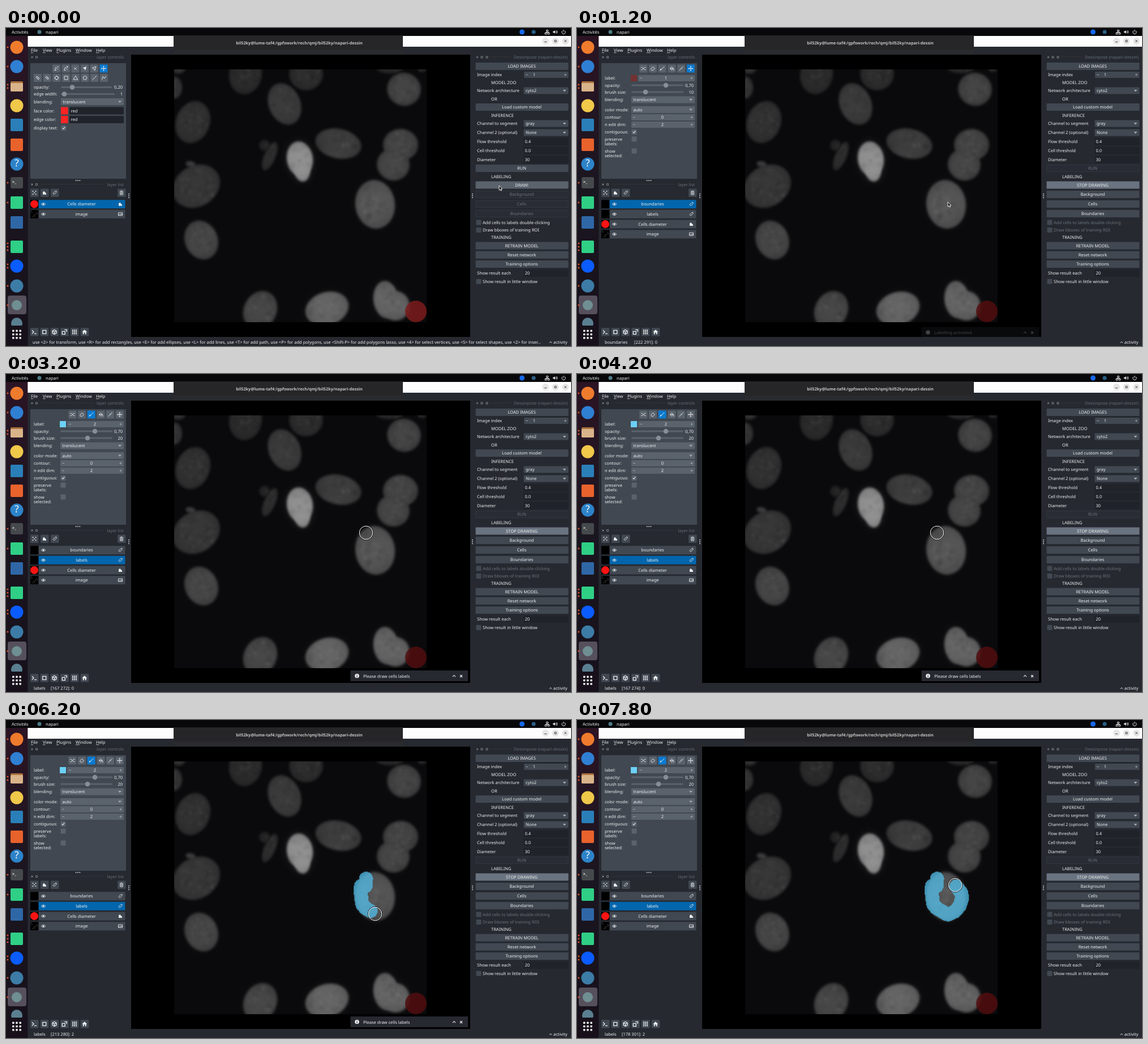
Animation of 998 by 561 pixels, one loop 8 s. Source, as an HTML page with a canvas:

```html
<!DOCTYPE html>
<html lang="fr">
<head>
<meta charset="utf-8">
<title>napari</title>
<style>
html, body { margin: 0; width: 100%; height: 100%; overflow: hidden; background: #000; }
canvas { display: block; }
</style>
</head>
<body>
<canvas id="stage" width="998" height="561"></canvas>
<script>
const LOOP = 8000, STEP = 100;
const DRAW_ON = 800, CELLS_ON = 2500, PAINT_ON = 4200;
const BG = '#262930', PANEL = '#414851', LIGHT = '#5a626c', PRESSED = '#6a7380', FIELD = '#20232a';
const BLUE = '#0366ad', TEXT = '#eef0f1', DIM = '#666c74', RED = '#fb2424';
const ctx = document.getElementById('stage').getContext('2d');

// Pointer path: time, x, y
const PATH = [
  [0, 872, 282], [300, 872, 282], [700, 800, 330], [1000, 670, 375], [1100, 657.6, 348],
  [1200, 656, 311], [1500, 668, 309], [1900, 850, 316], [2200, 876, 311], [2600, 876, 311],
  [3000, 650, 286], [3100, 634, 280], [3200, 636, 280], [4200, 636, 280], [4500, 635, 293],
  [4700, 627, 293], [4850, 626, 299], [5100, 628, 317], [5200, 629, 323], [5600, 630, 326],
  [5900, 635, 332], [6100, 644, 337], [6200, 652, 342], [6400, 656, 343], [6700, 667, 338],
  [6950, 676, 328], [7200, 680, 315], [7400, 679, 305], [7700, 670, 293.6], [7800, 668, 291]
];

function pointer(t) {
  const i = PATH.findIndex(p => p[0] > t);
  if (i < 0) return PATH[PATH.length - 1].slice(1);
  if (i === 0) return PATH[0].slice(1);
  const [t0, x0, y0] = PATH[i - 1], [t1, x1, y1] = PATH[i];
  const k = (t - t0) / (t1 - t0);
  return [x0 + (x1 - x0) * k, y0 + (y1 - y0) * k];
}

// ---------- drawing helpers ----------
function box(x, y, w, h, color, r = 0) {
  ctx.fillStyle = color;
  ctx.beginPath();
  ctx.roundRect(x, y, w, h, r);
  ctx.fill();
}
function disc(x, y, r, color) {
  ctx.fillStyle = color;
  ctx.beginPath();
  ctx.arc(x, y, r, 0, 7);
  ctx.fill();
}
function ring(x, y, r, color, width) {
  ctx.strokeStyle = color;
  ctx.lineWidth = width;
  ctx.beginPath();
  ctx.arc(x, y, r, 0, 7);
  ctx.stroke();
}
function text(s, x, y, color = TEXT, align = 'left', font = '7.54px') {
  ctx.font = font + ' "Noto Sans", sans-serif';
  ctx.textRendering = 'geometricPrecision';
  ctx.textAlign = align;
  ctx.fillStyle = color;
  ctx.fillText(s, x, y + 2.7);
}
function icon(x, y, d, color = TEXT, fill = false, width = 0.9) {
  ctx.save();
  ctx.translate(x, y);
  ctx.lineWidth = width;
  ctx.strokeStyle = ctx.fillStyle = color;
  const path = new Path2D(d);
  fill ? ctx.fill(path) : ctx.stroke(path);
  ctx.restore();
}

const CROSS = 'M-2-2L2 2M2-2L-2 2', CHECK = 'M-2.2 0L-.7 1.7L2.3-1.8', DOWN = 'M-3-1.5H3L0 2Z';
const SQUARE = 'M-3-3H3V3H-3Z', POLY = 'M-3.5-1L0-3.5L3.5-1L2 3H-2Z', ARROW = 'M3-3.5L-3.5-1L-.5 .5L1 3.5Z';
const PAN = 'M-4 0H4M0-4V4M-1.2-2.8L0-4L1.2-2.8M-1.2 2.8L0 4L1.2 2.8M-2.8-1.2L-4 0L-2.8 1.2M2.8-1.2L4 0L2.8 1.2';
const TAG = 'M-3 1L1-3H3V-1L-1 3Z', SHAPES = 'M-3 3V-1L-1-3L3 1V3Z';
const PICTURE = 'M-3.5-2.5H3.5V2.5H-3.5ZM-3 2L-1 0L.5 1.2L2-.6L3.3 1.5';
const LINK = 'M-3-1L-1-3L3 1L1 3ZM-1.5 .5L1.5-.5', VERTEX = 'M-3 3L-1-2L3 2M-3 3H0';
const LABEL_TOOLS = ['M-4-2H-2L2 2H4M-4 2H-2L2-2H4', 'M-3.5 1L0-3L3.5 0L.5 3H-2Z',
  'M3.5-3.5L-1 1M-1 1L-3.5 3.5L-3 1Z', 'M-3 0L0-3L3 0L0 3ZM3.5 1V3.5M-3 0H3', 'M3.5-3.5L1-1M-.5-1.5L1.5 .5M.5-.5L-3.5 3.5', PAN];
const SHAPE_TOOLS = [VERTEX + 'M1-3H4', VERTEX + 'M1-3H4M2.5-4.5V-1.5', CROSS, ARROW, ARROW, PAN];
const SHAPE_TOOLS_2 = [LINK, LINK, 'M3 0A3 3 0 1 1-3 0A3 3 0 1 1 3 0M-4 0H-2M2 0H4M0-4V-2M0 2V4', SQUARE,
  'M0-3.5L3.8 3H-3.8Z', POLY, 'M-3.5 3.5L3.5-3.5', 'M-3.5 3L-1.5-2.5L1 1L3.5-3'];

function tools(list, x, y, selected, filled = -1) {
  list.forEach((d, i) => {
    const cx = x + i * 16.7;
    box(cx - 7, y - 7, 14, 14, i === selected ? '#0a7ad0' : LIGHT, 1);
    icon(cx, y, d, TEXT, i === filled);
  });
}
function button(s, y, state) {
  const off = state === 'off';
  const fill = { hot: LIGHT, pressed: PRESSED, off: '#343941' }[state] || PANEL;
  box(829.5, y - 6.5, 164, 13, fill, 1);
  if (off) box(830.3, y - 5.7, 162.4, 11.4, '#292c34', 1);
  text(s, 911, y, off ? '#6d737b' : TEXT, 'center');
}
function combo(s, x, y, right, color) {
  box(x, y - 6, right - x, 12, color, 1);
  text(s, x + 3.5, y);
  icon(right - 7, y, DOWN, '#a4aab1', true);
}
function spin(s, x, y, right, at, color) {
  box(x, y - 5.5, right - x, 11, color, 1);
  icon(x + 5, y, 'M-2 0H2', '#a4aab1');
  icon(right - 5.5, y, 'M-2 0H2M0-2V2', '#a4aab1');
  text(s, at, y, TEXT, 'center');
}
function field(s, x, y, right) {
  box(x, y - 6.5, right - x, 13, FIELD, 1);
  text(s, x + 2.5, y);
}
function checkbox(x, y, checked, color = PANEL) {
  box(x - 4.5, y - 4.5, 9, 9, color, 1);
  if (checked) icon(x, y, CHECK, TEXT, false, 1.1);
}
function slider(x, right, y, at, value) {
  box(x, y - 1.5, right - x, 3, LIGHT, 1.5);
  disc(at, y, 4.3, '#868e98');
  text(value, 206, y, TEXT, 'right');
}
function dockTitle(s, x, y, right, from, to) {
  icon(x, y, 'M-1.5-1.5L1.5 1.5M1.5-1.5L-1.5 1.5', '#a0a5ab');
  icon(x + 8, y, 'M-1.5-1.5H1.5V1.5H-1.5Z', '#a0a5ab', false, 0.7);
  box(from, y - 1, to - from, 0.7, '#343840');
  text(s, right, y, DIM, 'right');
}

// ---------- microscope picture, drawn once ----------
// x, y, rx, ry, rotation, brightness
const NUCLEI = [
  [330, 166, 30, 38, .35, 50], [297, 105, 14, 20, 0, 52], [304, 72, 13, 9, 0, 46], [423, 82, 29, 35, .2, 44],
  [530, 81, 30, 29, 0, 46], [492, 134, 28, 38, -.4, 60], [703, 108, 30, 29, .4, 70], [587, 204, 41, 26, .2, 62],
  [519, 231, 23, 31, -.15, 146], [523, 250, 14, 21, -.1, 146], [466, 226, 10, 27, .4, 46], [457, 207, 10, 10, 0, 38],
  [697, 206, 31, 28, 0, 70], [684, 241, 29, 28, .3, 72], [336, 279, 44, 36, -.55, 56], [326, 240, 9, 5, .2, 64],
  [652, 311, 35, 43, -.12, 88], [345, 374, 29, 35, -.4, 72], [449, 498, 29, 35, .45, 72],
  [567, 495, 39, 29, -.3, 102], [671, 479, 22, 33, -.1, 102], [688, 490, 25, 26, 0, 102], [678, 71, 24, 9, 0, 40],
  [735, 72, 8, 6, 0, 40]
];

function makePicture() {
  const canvas = document.createElement('canvas');
  canvas.width = 998;
  canvas.height = 561;
  const g = canvas.getContext('2d');
  let seed = 7;
  const random = () => (seed = seed * 16807 % 2147483647) / 2147483647;
  const gray = v => `rgb(${v},${v},${v + 1})`;
  g.beginPath();
  g.rect(297, 73, 446, 446);
  g.clip();
  g.fillStyle = '#0a0a0c';
  g.fillRect(297, 73, 446, 446);
  for (const [x, y, rx, ry, angle, v] of NUCLEI) {
    const outline = new Path2D();
    outline.ellipse(x, y, rx, ry, angle, 0, 7);
    g.save();
    // Lightening lets touching nuclei merge without a seam
    g.globalCompositeOperation = 'lighten';
    g.filter = 'blur(8px)';
    g.fillStyle = gray(Math.round(v * .22));
    g.fill(outline);
    g.filter = 'blur(2px)';
    const shade = g.createRadialGradient(x, y, 0, x, y, Math.max(rx, ry));
    shade.addColorStop(0, gray(v));
    shade.addColorStop(.6, gray(Math.round(v * .96)));
    shade.addColorStop(1, gray(Math.round(v * .82)));
    g.fillStyle = shade;
    g.fill(outline);
    g.globalCompositeOperation = 'source-over';
    g.clip(outline);
    for (let i = 0; i < rx * ry / 25; i++) {
      const a = random() * 7, d = Math.sqrt(random()) * .85;
      g.fillStyle = random() < .5 ? 'rgba(255,255,255,.035)' : 'rgba(0,0,0,.06)';
      g.beginPath();
      g.arc(x + Math.cos(a) * rx * d, y + Math.sin(a) * ry * d, 1.5 + random() * 2.5, 0, 7);
      g.fill();
    }
    g.restore();
  }
  return canvas;
}
const picture = makePicture();

// ---------- desktop ----------
function desktop() {
  box(0, 0, 998, 14, '#08080a');
  disc(59, 7, 3.5, '#4d7b86');
  text('Activités', 10, 7);
  text('napari', 70, 7);
  disc(911.5, 7, 4.5, '#1668e8');
  disc(932, 7, 3.5, '#2a5f86');
  icon(956, 7, 'M-1.5-3.5H1.5V-1H-1.5ZM-4 1.5H-1V4H-4ZM1 1.5H4V4H1ZM0-1V.5M-2.5 1.5V.5H2.5V1.5');
  icon(970, 7, 'M-4-1H-2L0-3V3L-2 1H-4Z', TEXT, true);
  icon(970, 7, 'M1.5-1.5Q3 0 1.5 1.5M2.7-3Q5 0 2.7 3');
  icon(985, 7, 'M-2-2.2A3.2 3.2 0 1 0 2-2.2M0-4V-.5');

  const shade = ctx.createLinearGradient(0, 14, 0, 561);
  shade.addColorStop(0, '#2c1424');
  shade.addColorStop(.5, '#1a1620');
  shade.addColorStop(1, '#17101a');
  box(0, 14, 38.5, 547, shade);
  box(3, 472, 33, 33, '#55505c', 4);
  const round = [[34, '#ef7b2d'], [68, '#2f7fd3'], [137, '#f0c84a'], [240, '#2d83c9'], [420, '#0b5cff'], [455, '#3c7ca6']];
  const square = [[171, '#2a7fb8'], [206, '#e8622c'], [308, '#2fcf86'], [343, '#2f67a6'], [386, '#2fcf86']];
  round.forEach(([y, color]) => disc(19, y, 11.5, color));
  square.forEach(([y, color]) => box(8, y - 11, 22, 22, color, 2));
  text('?', 19, 241.5, '#fff', 'center', '17px');
  box(8, 94, 22, 18, '#a8703c', 2);
  box(8, 97, 22, 15, '#d9b48a', 2);
  box(8, 263, 22, 20, '#45494c', 3);
  text('>_', 11, 271, '#fff', 'left', 'bold 7px');
  disc(19, 489, 9, '#6f8f92');
  ctx.save();
  ctx.beginPath();
  ctx.rect(0, 506, 38, 19);
  ctx.clip();
  disc(19, 521, 10, '#5a7f90');
  ctx.restore();
  for (let i = 0; i < 9; i++) box(11 + i % 3 * 6.2, 532.5 + Math.floor(i / 3) * 6.2, 3.6, 3.6, '#eee', 1);
  [[34, 1], [68, 1], [103, 2], [273, 1], [308, 1], [386, 3], [420, 2], [455, 1], [489, 1]].forEach(([y, n]) => {
    for (let i = 0; i < n; i++) disc(3, y + (i - (n - 1) / 2) * 6, 1.4, '#e4572c');
  });

  box(38.5, 14, 960, 19, '#fdfdfd');
  box(38.5, 33, 960, 528, BG);
  ['M-2 1.5H2', 'M-1.5-1.5H1.5V1.5H-1.5Z', 'M-1.7-1.7L1.7 1.7M1.7-1.7L-1.7 1.7'].forEach((d, i) => {
    disc(953 + i * 17.6, 23, 6, '#e6e6e6');
    icon(953 + i * 17.6, 23, d, '#333');
  });
  [['File', 44], ['View', 65], ['Plugins', 89], ['Window', 123], ['Help', 159]].forEach(([s, x]) => {
    text(s, x, 39.5);
    box(x, 43.4, ctx.measureText(s[0]).width, .7, TEXT);
  });
}

function terminalHeader() {
  box(296, 13, 405, 34, '#262628');
  box(296, 38, 405, 9, '#2a2b2e');
  text('bil52ky@lume-taf4:/gpfswork/rech/qmj/bil52ky/napari-dessin', 518, 26, '#c4c4c4', 'center', 'bold 7.25px');
}

// ---------- left column ----------
function shapeControls() {
  tools(SHAPE_TOOLS, 89, 71.5, 5, 3);
  tools(SHAPE_TOOLS_2, 56, 88, -1);
  text('opacity:', 49, 104.5);
  slider(97, 187, 104.5, 117, '0,20');
  text('edge width:', 49, 116.5);
  slider(97, 192, 116.5, 103, '1');
  text('blending:', 49, 130);
  combo('translucent', 97, 130, 208, LIGHT);
  [['face color:', 146], ['edge color:', 161.5]].forEach(([s, y]) => {
    text(s, 49, y);
    box(97, y - 6.5, 12.5, 13, RED);
    field('red', 112, y, 208);
  });
  text('display text:', 49, 176.5);
  checkbox(102, 176.5, true, LIGHT);
}

function labelControls(painting) {
  tools(LABEL_TOOLS, 117.3, 71.5, painting ? 2 : 5);
  text('label:', 49, 88.5);
  box(95, 83, 11, 11, painting ? '#6cd0f5' : '#74302f');
  spin(painting ? '2' : '1', 108, 88.5, 208, 157, LIGHT);
  text('opacity:', 49, 101);
  slider(96, 188, 101, 157, '0,70');
  text('brush size:', 49, 113);
  slider(96, 188, 113, painting ? 144 : 121, painting ? '20' : '10');
  text('blending:', 49, 126.5);
  combo('translucent', 96, 126.5, 208, LIGHT);
  text('color mode:', 49, 144);
  combo('auto', 96, 144, 208, LIGHT);
  text('contour:', 49, 157.5);
  spin('0', 96, 157.5, 208, 151, LIGHT);
  text('n edit dim:', 49, 170.5);
  spin('2', 96, 170.5, 208, 151, LIGHT);
  ['contiguous:', 'preserve', 'show'].forEach((s, i) => text(s, 49, [183.5, 196, 217][i]));
  text('labels:', 49, 204.5);
  text('selected:', 49, 225.5);
  checkbox(101, 183.5, true, LIGHT);
  checkbox(101, 196, false, LIGHT);
  checkbox(101, 217, false, LIGHT);
}

function layerList(drawing, painting) {
  dockTitle('layer list', 46, 276, 208, 62, 172);
  [[50, 'M-3-3h1v1h-1zM2-3h1v1h-1zM-.5-.5h1v1h-1zM-3 2h1v1h-1zM2 2h1v1h-1z'], [68, SHAPES], [86, TAG],
    [204, 'M-3-2.5H3M-1-3.5H1M-2.3-2.5V3.5H2.3V-2.5M-.7-1V2M.7-1V2']].forEach(([x, d], i) => {
    box(x - 7, 283.5, 14.5, 14.5, PANEL, 1);
    icon(x, 290.7, d, TEXT, i === 1);
  });
  const layers = ['Cells diameter', 'image'];
  if (drawing) layers.unshift('boundaries', 'labels');
  const selected = painting ? 1 : 0;
  layers.forEach((name, i) => {
    const y = 310.7 + i * 17.65;
    box(43, y - 7.5, 167.5, 15, i === selected ? BLUE : PANEL, 1);
    box(43, y - 7.5, 14.5, 15, '#000');
    if (name === 'Cells diameter') disc(50, y, 7, '#fa1414');
    if (name === 'image') for (let k = 0; k < 8; k++) disc(44.5 + k * 5 % 12, y - 5.5 + k * 7 % 11, .9, '#3c3c3c');
    icon(66, y, 'M-3.7 0Q0-4 3.7 0Q0 4-3.7 0Z');
    disc(66, y, 1.2, TEXT);
    text(name, 133.5, y, TEXT, 'center');
    const d = name === 'image' ? PICTURE : name === 'Cells diameter' ? SHAPES : TAG;
    icon(202, y, d, TEXT, d === SHAPES);
  });
}

function leftColumn(drawing, painting) {
  dockTitle('layer controls', 46, 51.5, 208, 62, 157);
  box(43, 62, 169, 204, PANEL, 1);
  drawing ? labelControls(painting) : shapeControls();
  layerList(drawing, painting);
  for (let i = -1; i < 2; i++) {
    disc(127 + i * 3.3, 269, 1, '#c8cbce');
    disc(217, 296 + i * 3.3, 1, '#c8cbce');
    disc(824, 296 + i * 3.3, 1, '#c8cbce');
  }
  ['M-4-3L-1 0L-4 3M0 3H4', SQUARE, 'M0-4L3.5-2V2L0 4L-3.5 2V-2ZM-3.5-2L0 0L3.5-2M0 0V4',
    'M-4-1H1V4H-4ZM0-4H4V0', 'M-4-4h2v2h-2zM-1-4h2v2h-2zM2-4h2v2h-2zM-4-1h2v2h-2zM-1-1h2v2h-2zM2-1h2v2h-2zM-4 2h2v2h-2zM-1 2h2v2h-2zM2 2h2v2h-2z',
    'M-4.5 0L0-4L4.5 0H3V4H1V1H-1V4H-3V0Z'].forEach((d, i) => {
    const x = 50 + i * 17.75;
    box(x - 7, 529, 14.5, 14.5, PANEL, 1);
    icon(x, 536.3, d, TEXT, i > 3, 1.3);
  });
}

// ---------- right column ----------
function rightColumn(drawing, hoverCells) {
  dockTitle('Dessinpose (napari-dessin)', 832.5, 51.5, 992, 855, 892);
  icon(849.5, 51.5, 'M-1.5-1.5H1.5V1.5H-1.5Z', '#a0a5ab', false, 0.7);
  button('LOAD IMAGES', 67.5);
  text('Image index', 832, 82.5);
  spin('1', 915, 82.5, 993.5, 933, PANEL);
  [['MODEL ZOO', 96], ['OR', 125], ['INFERENCE', 154], ['LABELING', 262], ['TRAINING', 369.5]].forEach(([s, y]) => text(s, 857, y));
  [['Network architecture', 'cyto2', 110.5], ['Channel to segment', 'gray', 168.5], ['Channel 2 (optional)', 'None', 184.5]].forEach(([s, value, y]) => {
    text(s, 832, y);
    combo(value, 914.5, y, 993.5, PANEL);
  });
  [['Flow threshold', '0.4', 200.5], ['Cell threshold', '0.0', 216], ['Diameter', '30', 232], ['Show result each', '20', 432.5]].forEach(([s, value, y]) => {
    text(s, 832, y);
    field(value, 914, y, 993.5);
  });
  button('Load custom model', 139.5);
  button('RUN', 247.5, drawing && 'off');
  button(drawing ? 'STOP DRAWING' : 'DRAW!', 277, drawing ? 'pressed' : 'hot');
  button('Background', 293.5, !drawing && 'off');
  button('Cells', 310.5, !drawing ? 'off' : hoverCells && 'hot');
  button('Boundaries', 327.5, !drawing && 'off');
  button('RETRAIN MODEL', 384);
  button('Reset network', 400.3);
  button('Training options', 416.5);
  [['Add cells to labels double-clicking', 343], ['Draw bboxes of training ROI', 356.5], ['Show result in little window', 447.3]].forEach(([s, y], i) => {
    checkbox(835, y, false);
    text(s, 842, y, drawing && i < 2 ? '#6d737b' : TEXT);
  });
}

// ---------- canvas ----------
const SCALE = 360 / 446;
const toCell = ([x, y]) => [(x - 297) * SCALE, (y - 73) * SCALE];

// Pixelated brush stroke on the 360 x 360 label grid
function paintStroke(until) {
  const dabs = [];
  for (let t = PAINT_ON; t <= until; t += 25) dabs.push(toCell(pointer(t)));
  ctx.beginPath();
  for (let row = 150; row < 235; row++) {
    for (let col = 250; col < 325; col++) {
      if (dabs.some(([x, y]) => (col + .5 - x) ** 2 + (row + .5 - y) ** 2 < 98)) {
        ctx.rect(297 + col / SCALE, 73 + row / SCALE, 1 / SCALE + .02, 1 / SCALE + .02);
      }
    }
  }
  ctx.fillStyle = 'rgba(84,196,240,.72)';
  ctx.fill();
}

function notice(s, t, start, end) {
  const alpha = Math.min(1, (t - start) / 400, (end - t) / 400);
  if (alpha <= 0) return;
  const y = 533 + (1 - alpha) * 6;
  ctx.save();
  ctx.globalAlpha = alpha;
  box(608.5, y - 10, 207.5, 19, BG, 1);
  disc(620, y - .5, 3.8, TEXT);
  box(619.4, y - 1, 1.2, 3, BG);
  box(619.4, y - 2.9, 1.2, 1.2, BG);
  text(s, 631, y);
  icon(791.5, y, 'M-2.5 1.2L0-1.5L2.5 1.2', TEXT, false, 1.1);
  icon(804, y, CROSS, TEXT, false, 1.1);
  ctx.restore();
}

function statusBar(t, drawing, painting, onCanvas) {
  if (!drawing) {
    text('use <2> for transform, use <R> for add rectangles, use <E> for add ellipses, use <L> for add lines, use <T> for add path, use <P> for add polygons, use <Shift-P> for add polygons lasso, use <4> for select vertices, use <5> for select shapes, use <2> for inser…', 47, 554.5);
  } else if (onCanvas) {
    const [col, row] = toCell(pointer(t - STEP)).map(Math.round);
    text(painting ? 'labels' : 'boundaries', 49, 554.5);
    text(`[${row} ${col}]: ${t > PAINT_ON ? 2 : 0}`, painting ? 79 : 101, 554.5);
  } else {
    text('use <1> for activate the label eraser, use <2> for activate the paint brush, use <3> for activate the fill bucket, use <4> for pick mode', 942, 554.5, TEXT, 'right');
  }
  icon(962, 554.5, 'M-2 1.2L0-1.3L2 1.2');
  text('activity', 991.5, 554.5, TEXT, 'right');
}

function render(t) {
  const drawing = t >= DRAW_ON, painting = t >= CELLS_ON;
  const [x, y] = pointer(t);
  const onCanvas = x > 221 && x < 820;
  desktop();
  box(221, 47, 599, 498, '#000');
  ctx.drawImage(picture, 0, 0);
  disc(724, 500, 19, drawing ? 'rgba(82,14,15,.85)' : 'rgba(124,28,28,.85)');
  if (t > PAINT_ON) paintStroke(t - STEP);
  terminalHeader();
  leftColumn(drawing, painting);
  rightColumn(drawing, x > 830 && y > 304 && y < 317);
  notice('Labelling activated', t, 1100, 3000);
  notice('Please draw cells labels', t, 2600, 7200);
  statusBar(t, drawing, painting, onCanvas);
  if (painting && onCanvas) {
    ring(x, y, 12.6, '#000', 1);
    ring(x, y, 11.8, '#fff', 1);
  } else {
    ctx.save();
    ctx.translate(x - 1, y - 4);
    const arrow = new Path2D('M0 0V8.2L1.9 6.5L3.2 9.2L4.6 8.5L3.3 6H5.8Z');
    ctx.fillStyle = '#111';
    ctx.strokeStyle = '#fff';
    ctx.lineWidth = .9;
    ctx.fill(arrow);
    ctx.stroke(arrow);
    ctx.restore();
  }
}

const start = performance.now();
let shown = -1;
function tick() {
  const t = Math.floor((performance.now() - start) % LOOP / STEP) * STEP;
  if (t !== shown) render(shown = t);
  requestAnimationFrame(tick);
}
tick();
</script>
</body>
</html>
```
